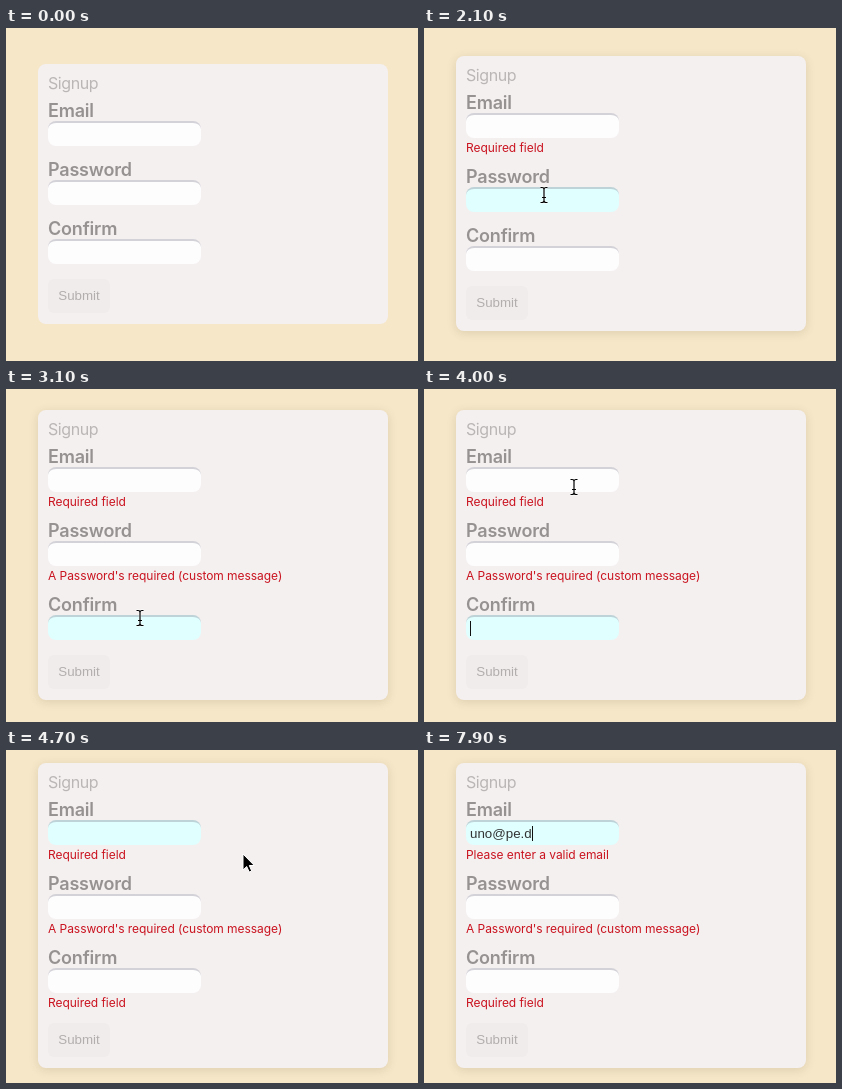
These frames come from a looping animation (412 px wide and 333 px high, 8000 ms). An HTML page:

```html
<!DOCTYPE html>
<html lang="en">
<head>
<meta charset="utf-8">
<title>Signup form</title>
<style>
html, body { margin: 0; width: 100%; height: 100%; overflow: hidden; background: #f5e7c8; }
body { position: relative; font-family: Inter, "Open Sans", sans-serif; }
.card {
  position: absolute; left: 32px; width: 330px; height: 250px; padding: 10px 10px 0;
  border-radius: 8px; background: #f5f0f0;
}
.title { height: 28px; line-height: 19px; font-size: 16px; letter-spacing: -.4px; color: #bab6b6; }
.field { height: 59px; }
.label { height: 19px; line-height: 17px; font-size: 18px; font-weight: 600; letter-spacing: -.2px; color: #979292; }
.input {
  box-sizing: border-box; width: 153px; height: 25px; padding-left: 4px;
  border-top: 2px solid rgba(110, 110, 125, .3); border-radius: 8px;
  font: 13.333px/23px "Liberation Sans", Arial, sans-serif; color: #333; white-space: pre;
}
.caret { display: inline-block; width: 1px; height: 15px; background: #111; vertical-align: -3px; }
.error { height: 15px; line-height: 19px; font-size: 12px; letter-spacing: -.05px; color: #c9131f; white-space: nowrap; }
.button {
  width: 62px; height: 34px; border-radius: 6px; background: #f0ecec; color: #b3aeae;
  font: 13.333px/34px "Liberation Sans", Arial, sans-serif; text-align: center;
}
.cursor { position: absolute; left: 0; top: 0; overflow: visible; }
</style>
</head>
<body>
<div class="card">
  <div class="title">Signup</div>
  <div class="field"><div class="label">Email</div><div class="input"><span></span><i class="caret"></i></div><div class="error"></div></div>
  <div class="field"><div class="label">Password</div><div class="input"><span></span><i class="caret"></i></div><div class="error">A Password's required (custom message)</div></div>
  <div class="field"><div class="label">Confirm</div><div class="input"><span></span><i class="caret"></i></div><div class="error">Required field</div></div>
  <div class="button">Submit</div>
</div>
<svg class="cursor" width="1" height="1">
  <path id="arrow" d="M0 0V16L3.7 12.5L6.2 18L8.7 17L6.3 11.5H11.3Z" fill="#000" stroke="#fff"/>
  <g id="beam" fill="none">
    <path id="bar" d="M-3.5 -7.5H-2Q0 -7.5 0 -5.5Q0 -7.5 2 -7.5H3.5M0 -6V6M-3.5 7.5H-2Q0 7.5 0 5.5Q0 7.5 2 7.5H3.5M-2 2.5H2" stroke="#fff" stroke-width="2.4" stroke-opacity=".7"/>
    <use href="#bar" style="display:none"/>
    <path d="M-3.5 -7.5H-2Q0 -7.5 0 -5.5Q0 -7.5 2 -7.5H3.5M0 -6V6M-3.5 7.5H-2Q0 7.5 0 5.5Q0 7.5 2 7.5H3.5M-2 2.5H2" stroke="#000" stroke-width="1.2"/>
  </g>
</svg>
<script>
const LOOP = 8000, TICK = 100;
const all = s => [...document.querySelectorAll(s)];
const [card] = all('.card'), [cursor] = all('.cursor');
const fields = all('.field'), inputs = all('.input'), errors = all('.error');
const texts = all('.input span'), carets = all('.caret');
const arrow = document.getElementById('arrow'), beam = document.getElementById('beam');

// All times below are in ticks of 100 ms.
const clicks = [[8, 0], [18, 1], [28, 2], [41, 0]];
const blurs = [18, 28, 41];
const typed = 'uno@pe.d', keys = [49, 54, 62, 67, 69, 71, 74, 78];
const path = [
  [3, 389, 214], [4, 300, 168], [5, 205, 124], [6, 128, 100], [7, 108, 104],
  [13, 108, 104], [14, 111, 105], [17, 118, 164], [22, 120, 168], [27, 133, 224],
  [28, 134, 229], [33, 134, 229], [39, 149, 108], [40, 150, 98], [41, 148, 92],
  [43, 148, 92], [47, 237, 104], [48, 238, 104]
];

const clamp = v => Math.max(0, Math.min(1, v));
const ease = v => 1 - (1 - clamp(v)) ** 2;
const show = (el, on) => { el.style.visibility = on ? 'visible' : 'hidden'; };

function pointerAt(k) {
  if (k < path[0][0] || k >= keys[0]) return null;
  const i = path.findIndex(p => p[0] > k);
  if (i < 0) return path[path.length - 1].slice(1);
  const [a, x, y] = path[i - 1], [b, u, v] = path[i];
  const f = (k - a) / (b - a);
  return [x + (u - x) * f, y + (v - y) * f];
}

function focusOf(index, k) {
  let level = 0;
  clicks.forEach(([at, field]) => {
    const f = clamp((k - at) / 2);
    level += ((field === index ? 1 : 0) - level) * f;
  });
  return level;
}

function render(k) {
  const open = blurs.map(at => ease((k - at) / 3));
  const top = Math.floor(36 - 7.5 * (open[0] + open[1] + open[2]));
  const grown = open.map(p => Math.round(15 * p));
  const hover = clamp((k - 3) / 3);
  card.style.top = top + 'px';
  card.style.height = 250 + grown[0] + grown[1] + grown[2] + 'px';
  card.style.boxShadow = `0 2px 10px rgba(90, 70, 30, ${0.15 * hover})`;

  const count = keys.filter(at => at <= k).length;
  texts[0].textContent = typed.slice(0, count);
  errors[0].textContent = k < 59 ? 'Required field' : 'Please enter a valid email';
  show(carets[0], count > 0);
  show(carets[1], false);
  show(carets[2], k >= 35 && k <= 40);

  const at = pointerAt(k);
  let overInput = false, y = top + 57;
  fields.forEach((field, i) => {
    const f = focusOf(i, k);
    field.style.height = 59 + grown[i] + 'px';
    errors[i].style.opacity = open[i];
    inputs[i].style.backgroundColor = `rgb(${254 - 30 * f}, ${253 + 2 * f}, ${254 + f})`;
    if (at && at[0] > 42 && at[0] < 195 && at[1] >= y && at[1] < y + 25) overInput = true;
    y += 59 + grown[i];
  });

  show(arrow, at && !overInput);
  show(beam, at && overInput);
  if (at) cursor.style.transform = `translate(${Math.round(at[0])}px, ${Math.round(at[1])}px)`;
}

const start = performance.now();
function frame() {
  render(Math.floor((performance.now() - start) % LOOP / TICK));
  requestAnimationFrame(frame);
}
render(0);
requestAnimationFrame(frame);
</script>
</body>
</html>
```
